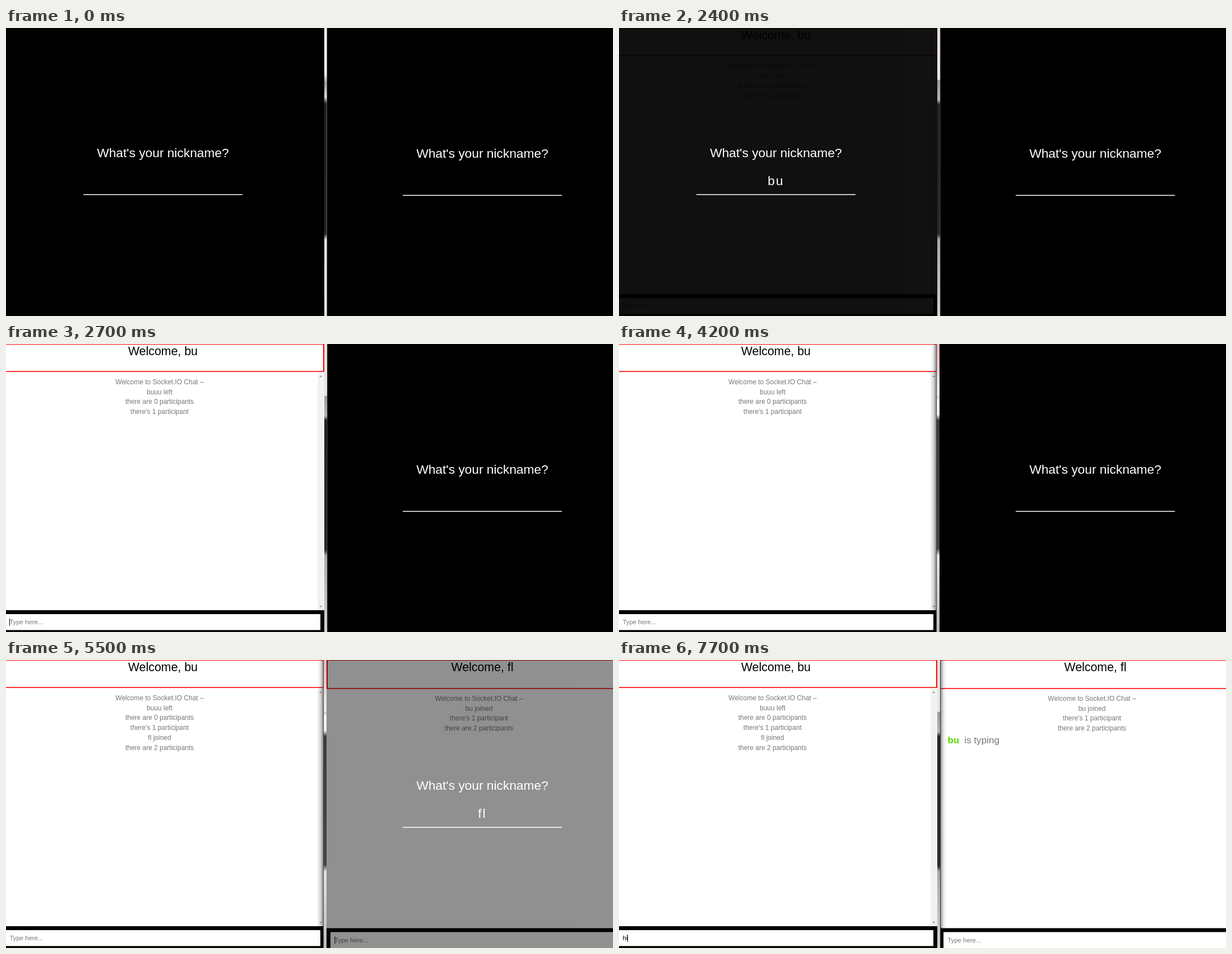
An HTML page that plays this animation: 1087x515 px, repeating every 8000 ms.

```html
<!DOCTYPE html>
<html lang="en">
<head>
<meta charset="utf-8">
<title>Chat in two windows</title>
<style>
  html, body { margin: 0; width: 100%; height: 100%; overflow: hidden; background: #000; }
  svg { display: block; width: 1087px; height: 515px; }
  text { font-family: "Liberation Sans", Arial, sans-serif; white-space: pre; }
</style>
</head>
<body>
<svg id="stage" viewBox="0 0 1087 515">
  <defs>
    <linearGradient id="glassIdle" x2="0" y2="1">
      <stop offset="0" stop-color="#f4f4f4"/><stop offset=".16" stop-color="#eee"/>
      <stop offset=".19" stop-color="#999"/><stop offset=".24" stop-color="#ddd"/>
      <stop offset=".262" stop-color="#222"/><stop offset=".715" stop-color="#262626"/>
      <stop offset=".735" stop-color="#ddd"/><stop offset="1" stop-color="#e2e2d8"/>
    </linearGradient>
    <linearGradient id="glassLeft" x2="0" y2="1">
      <stop offset="0" stop-color="#eadede"/><stop offset=".178" stop-color="#e6e6e6"/>
      <stop offset=".182" stop-color="#9c9c9c"/><stop offset=".25" stop-color="#b4b4b4"/>
      <stop offset=".265" stop-color="#222"/><stop offset=".715" stop-color="#2a2a2a"/>
      <stop offset=".735" stop-color="#aaa"/><stop offset="1" stop-color="#d2d2c8"/>
    </linearGradient>
    <linearGradient id="glassRight" x2="0" y2="1">
      <stop offset="0" stop-color="#e2b8b8"/><stop offset=".09" stop-color="#e6cccc"/>
      <stop offset=".12" stop-color="#e2e2e2"/><stop offset=".178" stop-color="#ececec"/>
      <stop offset=".182" stop-color="#ccc"/><stop offset=".195" stop-color="#f4f4f4"/>
      <stop offset=".245" stop-color="#eee"/><stop offset=".265" stop-color="#3c3c3c"/>
      <stop offset=".71" stop-color="#444"/><stop offset=".735" stop-color="#e4e4e4"/>
      <stop offset="1" stop-color="#bbb"/>
    </linearGradient>
    <linearGradient id="shadeLeft">
      <stop offset="0" stop-opacity="0"/><stop offset=".5" stop-opacity=".1"/>
      <stop offset="1" stop-opacity=".42"/>
    </linearGradient>
    <linearGradient id="shadeRight">
      <stop offset="0" stop-opacity=".42"/><stop offset=".5" stop-opacity=".1"/>
      <stop offset="1" stop-opacity="0"/>
    </linearGradient>
  </defs>
</svg>
<script>
const LOOP = 8000, STEP = 100;
const stage = document.getElementById('stage');

function add(parent, tag, attrs = {}, content = '') {
  const node = document.createElementNS('http://www.w3.org/2000/svg', tag);
  for (const key in attrs) node.setAttribute(key, attrs[key]);
  node.textContent = content;
  parent.append(node);
  return node;
}
const group = parent => add(parent, 'g');
const rect = (parent, x, y, width, height, fill) =>
  add(parent, 'rect', { x, y, width, height, fill });
const label = (parent, content, x, y, size, fill, more = {}) =>
  add(parent, 'text', { x, y, 'font-size': size, fill, ...more }, content);
const MIDDLE = { 'text-anchor': 'middle' };
const show = (node, on) => { node.style.display = on ? '' : 'none'; };

// One chat window: page below, nickname prompt above.
function makeWindow(x, end, mid, inputX, drop, name, lines) {
  const root = group(stage), page = group(root), login = group(root);
  const width = end - x, edge = x ? 0 : 2, lead = x ? 2 : 0;
  rect(page, x, 0, width, 515, '#fff');
  rect(page, x, 0, width, 50 + drop / 2, '#f00');
  rect(page, x + lead, 1, width - lead - edge, 47.4 + drop / 2, '#fff');
  label(page, 'Welcome, ' + name, mid, 20, 21.4, '#000', MIDDLE);
  const log = lines.map((line, i) =>
    label(page, line, mid - 6, 72 + drop / 4 + i * 17.72, 12, '#777', MIDDLE));
  rect(page, x, 476 + drop, width, 39 - drop, '#000');
  const boxX = x ? x + 7 : 0;
  rect(page, boxX, 483 + drop, (x ? end : 563) - boxX, 28.5, '#fff');
  const hint = label(page, 'Type here...', inputX, 501 + drop, 11.4, '#757575');
  const message = label(page, '', inputX, 501 + drop, 11.4, '#000');
  const chatCaret = rect(page, inputX, 491 + drop, 1, 13, '#000');

  const sink = drop / 2.4;
  rect(login, x, 0, width, 515, '#000');
  label(login, "What's your nickname?", mid, 231 + sink, 22.8, '#fff', MIDDLE);
  rect(login, mid - 142.5, 297.1 + sink, 285, 1.5, '#fff');
  const nick = label(login, '', mid, 281 + sink, 22.8, '#fff', { 'letter-spacing': 2.1 });
  const loginCaret = rect(login, mid, 260 + Math.round(sink), 1, 26, '#fff');
  return { page, login, log, hint, message, chatCaret, nick, loginCaret, name, mid, inputX };
}

const left = makeWindow(0, 570, 281, 6.5, 0, 'bu', [
  'Welcome to Socket.IO Chat –', 'buuu left', 'there are 0 participants',
  "there's 1 participant", 'fl joined', 'there are 2 participants']);
const right = makeWindow(574, 1087, 853, 588.5, 3.5, 'fl', [
  'Welcome to Socket.IO Chat –', 'bu joined', "there's 1 participant",
  'there are 2 participants']);

// Scrollbar of the left window.
const bar = group(left.page);
rect(bar, 558, 51, 12, 425, '#f1f1f1');
add(bar, 'path', { d: 'M561 59h5l-2.5-3zM561 468h5l-2.5 3z', fill: '#999' });

const typing = group(right.page);
label(typing, 'bu', 588.5, 149, 17, '#58dc00', { 'font-weight': 700 });
label(typing, 'is typing', 618.5, 149, 17.1, '#777');

// Glass border between the windows, for each focus state.
function makeBorder(x, width, fill, outlineX, outline, shadeX, shade) {
  const border = group(stage);
  rect(border, x, 0, width, 515, `url(#${fill})`);
  rect(border, outlineX, 0, 1, 515, outline);
  if (shade) rect(border, shadeX, 0, 10, 515, `url(#${shade})`);
  return border;
}
const borders = {
  idle: makeBorder(570, 5, 'glassIdle', 574, '#8888'),
  left: makeBorder(570, 6, 'glassLeft', 575, '#333', 576, 'shadeRight'),
  right: makeBorder(569, 5, 'glassRight', 568, '#444', 558, 'shadeLeft')
};

Object.assign(left, {
  keys: [1700, 1800], fade: [2340, 360],
  loginBlink: [[500, 1000], [1400, 2300]],
  chatBlink: [[2400, 2900], [3400, 3700], [6700, 7200], [7600, LOOP]]
});
Object.assign(right, {
  keys: [4800, 4900], fade: [5282, 400],
  loginBlink: [[3700, 4200], [4700, 5400]],
  chatBlink: [[5400, 5800], [6300, 6700]]
});

const within = (spans, t) => spans.some(([from, to]) => t >= from && t < to);
const typed = (keys, t) => keys.filter(key => t >= key).length;
const swing = p => 0.5 - Math.cos(Math.PI * Math.min(1, Math.max(0, p))) / 2;

function drawWindow(win, t) {
  const text = win.name.slice(0, typed(win.keys, t));
  win.nick.textContent = text;
  const width = text ? win.nick.getComputedTextLength() : 0;
  win.nick.setAttribute('x', win.mid - width / 2);
  win.loginCaret.setAttribute('x', Math.round(win.mid + width / 2));
  show(win.loginCaret, within(win.loginBlink, t));
  show(win.chatCaret, within(win.chatBlink, t));
  const [start, span] = win.fade;
  win.login.style.opacity = 1 - swing((t - start) / span);
}

function draw(now) {
  const t = Math.floor(now % LOOP / STEP) * STEP;
  drawWindow(left, t);
  drawWindow(right, t);

  const joined = swing((t - 5288) / 150);
  left.log.slice(4).forEach(line => { line.style.opacity = joined; });

  const text = 'hi'.slice(0, typed([7600, 7700], t));
  left.message.textContent = text;
  show(left.hint, !text);
  const width = text ? left.message.getComputedTextLength() : 0;
  left.chatCaret.setAttribute('x', Math.floor(left.inputX + width));
  typing.style.opacity = swing((t - 7525) / 150);

  const focus = t < 500 ? 'idle' : t >= 3700 && t < 6700 ? 'right' : 'left';
  for (const key in borders) show(borders[key], key === focus);
}

const begin = performance.now();
function tick() {
  draw(performance.now() - begin);
  requestAnimationFrame(tick);
}
tick();
</script>
</body>
</html>
```
